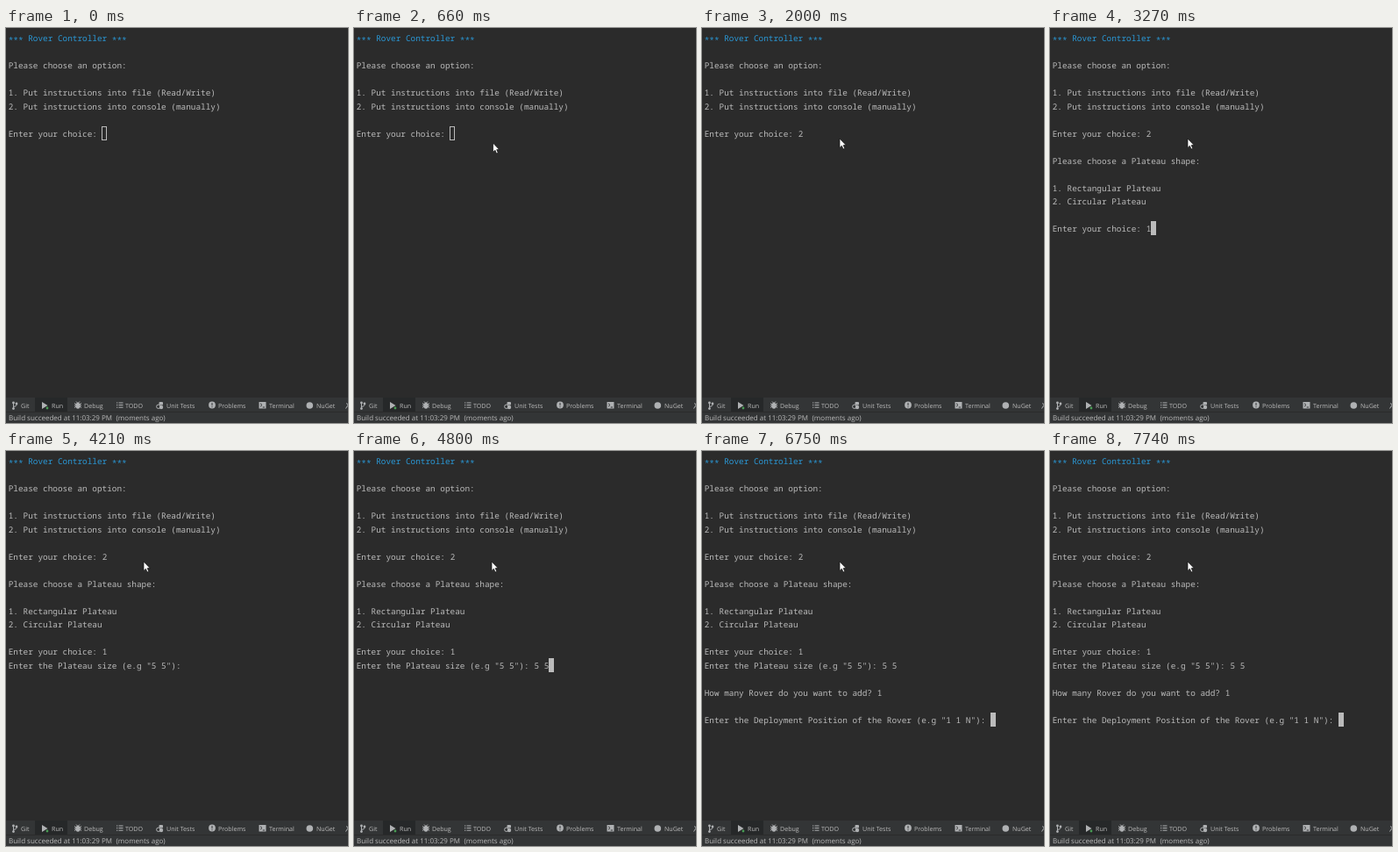
Recreate the animation shown at these times as an HTML page. Size 390 by 450 pixels, loop 8 s.

```html
<!DOCTYPE html>
<html lang="en">
<head>
<meta charset="utf-8">
<title>Rover Controller</title>
<style>
  html, body { margin: 0; width: 100%; height: 100%; overflow: hidden; background: #2b2b2b; }
  svg { display: block; }
  text { fill: #bbb; text-rendering: geometricPrecision; }
  #console { font: 9.38px "Noto Sans Mono", "DejaVu Sans Mono", monospace; }
  #tabs { font: 7.1px "Open Sans", "Noto Sans", sans-serif; }
  #status { font: 8px "Open Sans", "Noto Sans", sans-serif; }
  #icons { fill: #afb1b3; stroke: #afb1b3; stroke-width: 0; }
  #icons .line { fill: none; stroke-width: 1; }
  #icons .cut { fill: none; stroke: #333536; stroke-width: 1; }
</style>
</head>
<body>
<svg width="390" height="450" viewBox="0 0 390 450">
  <rect width="390" height="450" fill="#2b2b2b"/>
  <g id="console"></g>
  <rect id="caret" stroke="#bbb"/>
  <path id="pointer" d="M0 0V10.4L2.4 8.2L4 12L5.8 11.2L4.2 7.6H7.2Z"
        fill="#fff" stroke="#111" stroke-width=".7"/>

  <rect y="421" width="390" height="29" fill="#333536"/>
  <rect x="33" y="421" width="37" height="16" fill="#262829"/>
  <rect y="437" width="390" height="1" fill="#2b2b2b"/>
  <g id="tabs"></g>
  <g id="icons">
    <path class="line" d="M8.5 427V434M12 428V429.5Q12 431 8.5 431.5"/>
    <circle cx="8.5" cy="427" r="1.4"/><circle cx="8.5" cy="433.6" r="1.4"/><circle cx="12" cy="428" r="1.4"/>
    <path d="M41 426L47.5 430L41 434Z"/>
    <circle cx="47" cy="433" r="1.4" fill="#499c54"/>
    <path class="line" d="M78 427.5L86 432.5M78 430H86M78 432.5L86 427.5M80 425.5L82 427.5L84 425.5"/>
    <ellipse cx="82" cy="430.2" rx="2.5" ry="3.5"/>
    <path class="line" d="M126 427H127.3M128.5 427H133.5M126 429.6H127.3M128.5 429.6H133.5M126 432.2H127.3M128.5 432.2H133.5"/>
    <circle class="line" cx="173.8" cy="431.3" r="2.2"/>
    <rect x="174.5" y="426" width="4.5" height="3.6" rx="1"/>
    <circle cx="177" cy="432" r="2.2"/>
    <circle cx="235" cy="429.5" r="3.9"/>
    <path class="cut" d="M235 427V430.2M235 431.2V432.2"/>
    <rect x="288.5" y="426" width="8" height="7.5"/>
    <path class="cut" d="M290 427.7L292 429.5L290 431.3M292.7 432H295" stroke-width=".8"/>
    <circle cx="346.3" cy="430" r="3.8"/>
    <path class="line" d="M387.5 433.5L390 429.5M388 427.5L390 429"/>
  </g>
  <g id="status">
    <text x="3" y="447">Build succeeded at 11:03:29 PM</text>
    <text x="125.5" y="447">(moments ago)</text>
  </g>
</svg>
<script>
const LOOP = 8000, LEFT = 2.7, CELL = 5.63, ROW = 15.5;
const $ = id => document.getElementById(id);

// [time, row, column, text]
const lines = [
  [0, 0, 0, '<tspan dy="1.8">***</tspan><tspan dy="-1.8"> Rover Controller </tspan><tspan dy="1.8">***</tspan>'],
  [0, 2, 0, 'Please choose an option:'],
  [0, 4, 0, '1. Put instructions into file (Read/Write)'],
  [0, 5, 0, '2. Put instructions into console (manually)'],
  [0, 7, 0, 'Enter your choice:'],
  [1540, 7, 19, '2'],
  [2070, 9, 0, 'Please choose a Plateau shape:'],
  [2070, 11, 0, '1. Rectangular Plateau'],
  [2070, 12, 0, '2. Circular Plateau'],
  [2070, 14, 0, 'Enter your choice:'],
  [3270, 14, 19, '1'],
  [3740, 15, 0, 'Enter the Plateau size (e.g "5 5"):'],
  [4540, 15, 36, '5'],
  [4800, 15, 38, '5'],
  [5150, 17, 0, 'How many Rover do you want to add?'],
  [6130, 17, 35, '1'],
  [6750, 19, 0, 'Enter the Deployment Position of the Rover (e.g "1 1 N"):']
];

// [time, row, column]; a bare time hides the caret
const carets = [
  [0, 7, 19], [1540, 7, 20], [2000],
  [2070, 14, 19], [2520], [3070, 14, 19], [3270, 14, 20], [3670],
  [3740, 15, 36], [4210], [4540, 15, 37], [4670, 15, 38], [4800, 15, 39],
  [5150, 17, 35], [6130, 17, 36], [6680],
  [6750, 19, 58], [7210], [7740, 19, 58]
];
const FOCUS = 1080;

// [time, x, y]
const moves = [
  [400, 236, 232], [470, 214, 202], [530, 187, 167], [600, 167, 142], [660, 158.5, 131],
  [730, 157.5, 129], [800, 157, 127.5], [870, 157, 126.5], [930, 157, 126]
];

const tabs = [[17, 'Git'], [52, 'Run'], [89, 'Debug'], [136, 'TODO'], [183, 'Unit Tests'],
  [242, 'Problems'], [300, 'Terminal'], [354, 'NuGet']];

$('console').innerHTML = lines.map(([, row, col, text]) =>
  `<text x="${LEFT + col * CELL}" y="${15 + row * ROW}"${row ? '' : ' style="fill:#2a98d6"'}>${text}</text>`).join('');
$('tabs').innerHTML = tabs.map(([x, name]) => `<text x="${x}" y="433">${name}</text>`).join('');

const show = (el, on) => el.setAttribute('visibility', on ? 'visible' : 'hidden');
const latest = (list, t) => list.filter(e => e[0] <= t).pop();
const set = (el, attrs) => Object.entries(attrs).forEach(([k, v]) => el.setAttribute(k, v));

function draw(t) {
  lines.forEach((line, i) => show($('console').children[i], t >= line[0]));

  const [, row, col] = latest(carets, t);
  show($('caret'), row !== undefined);
  if (row !== undefined) set($('caret'), {
    x: Math.floor(LEFT + col * CELL) + .5,
    y: Math.floor(3.5 + row * ROW) + .5,
    width: 5, height: 15,
    fill: t < FOCUS ? 'none' : '#bbb'
  });

  const move = latest(moves, t);
  show($('pointer'), move);
  if (move) set($('pointer'), { transform: `translate(${move[1]} ${move[2]})` });
}

function tick() {
  draw(performance.now() % LOOP);
  requestAnimationFrame(tick);
}
tick();
</script>
</body>
</html>
```
